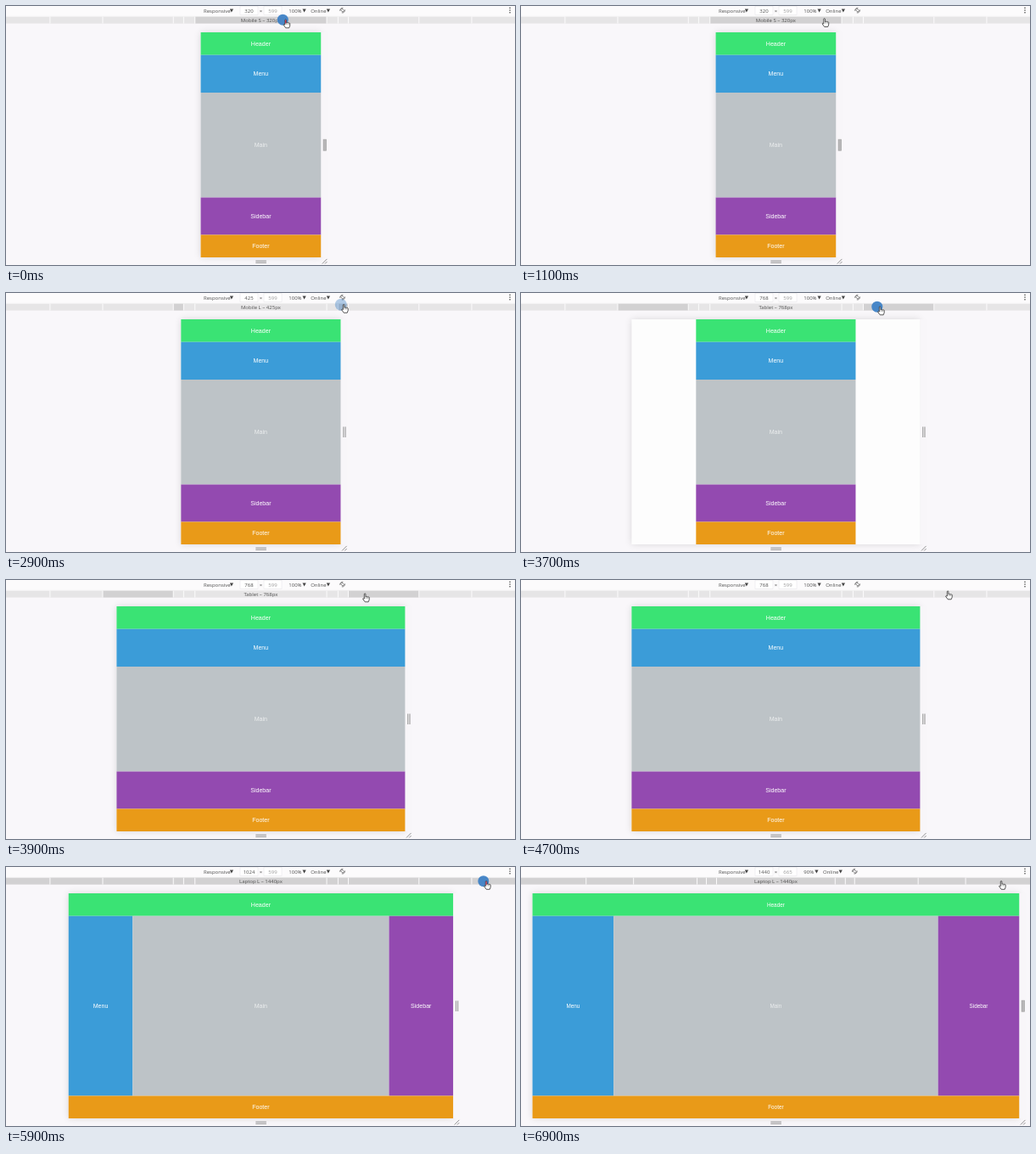
An HTML page for the animation above (7 s loop, 600x305 px).

```html
<!DOCTYPE html>
<html lang="en">
<head>
<meta charset="utf-8">
<title>Responsive layout</title>
<style>
html, body { margin: 0; width: 100%; height: 100%; overflow: hidden; background: #f9f7fa; }
svg { display: block; width: 100%; height: 100%; }
.ui { font: 6px "Open Sans", "Noto Sans", sans-serif; fill: #505050; }
.page { font-family: "Liberation Sans", Arial, sans-serif; fill: #fff; text-anchor: middle; }
</style>
</head>
<body>
<svg id="stage" viewBox="0 0 600 305" xmlns="http://www.w3.org/2000/svg"></svg>
<script>
const NS = "http://www.w3.org/2000/svg";
const LOOP = 7000, STEP = 100, CX = 300.4;
const stage = document.getElementById("stage");

function set(el, attrs) {
  for (const k in attrs) el.setAttribute(k, attrs[k]);
  return el;
}
function add(parent, tag, attrs, text) {
  const el = set(document.createElementNS(NS, tag), attrs || {});
  if (text) el.textContent = text;
  parent.appendChild(el);
  return el;
}
const rect = (p, x, y, width, height, fill) => add(p, "rect", { x, y, width, height, fill });
const show = (el, on) => el.setAttribute("visibility", on ? "visible" : "hidden");

// toolbar
const defs = add(stage, "defs");
const blur = add(defs, "filter", { id: "soft", x: "-10%", y: "-10%", width: "120%", height: "120%" });
add(blur, "feGaussianBlur", { stdDeviation: 4 });
rect(stage, 0, 0, 600, 305, "#f9f7fa");
rect(stage, 0, 0, 600, 11.5, "#fcfbfc");
const bar = add(stage, "g", { class: "ui" });

function menu(x, width) {
  const g = add(bar, "g", { transform: `translate(${x} 0)` });
  const label = add(g, "text", { x: 0, y: 7.7 });
  const arrow = add(g, "path", { fill: "#444" });
  return (text, left, w) => {
    label.textContent = text;
    set(g, { transform: `translate(${left} 0)` });
    set(arrow, { d: `M${w - 4.2} 3.6h4.2l-2.1 4z` });
  };
}
menu()("Responsive", 233, 35);
const setZoom = menu(), setNet = menu();

function field(x, fill) {
  add(bar, "rect", { x, y: 0.2, width: 21, height: 10.2, fill: "#fff", stroke: "#e4e2e5", "stroke-width": 0.5 });
  return add(bar, "text", { x: x + 10.5, y: 7.7, "text-anchor": "middle", fill });
}
const wide = field(276), high = field(304);
high.style.fill = "#999";
add(bar, "text", { x: 300.4, y: 7.7, "text-anchor": "middle" }, "×");
const rotate = add(bar, "g", { fill: "none", stroke: "#555", "stroke-width": 0.7 });
add(rotate, "rect", { x: -1.7, y: -1.2, width: 3.4, height: 2.4, transform: "rotate(45)" });
add(rotate, "path", { d: "M-2.8 .8A3 3 0 0 1 .8-2.8M2.8-.8A3 3 0 0 1-.8 2.8" });
for (const cy of [2.3, 5, 7.7]) add(bar, "circle", { cx: 594, cy, r: 0.8, fill: "#444" });

// breakpoint ruler, widest bar first
const PRESETS = [
  ["Laptop L", 1440], ["Laptop", 1024], ["Tablet", 768],
  ["Mobile L", 425], ["Mobile M", 375], ["Mobile S", 320]
];
const LIGHT = "#e6e5e6", DARK = "#d2d1d2";
const bands = PRESETS.map(([name, size]) => ({
  name, size,
  edge: rect(stage, 0, 12.6, 1, 8, "#fcfbfc"),
  fill: rect(stage, 0, 12.6, 1, 8, LIGHT)
}));
const hint = add(stage, "text", { class: "ui", x: CX, y: 18.9, "text-anchor": "middle" });

function drawRuler(hover, scale) {
  const widest = hover === 1440;
  for (const b of bands) {
    const half = b.size * 0.2427 * scale;
    set(b.edge, { x: CX - half - 0.5, width: 2 * half + 1 });
    set(b.fill, {
      x: CX - half + 0.5, width: 2 * half - 1,
      fill: widest || b.size === hover ? DARK : LIGHT
    });
    if (b.size === hover) hint.textContent = `${b.name} – ${b.size}px`;
  }
  show(hint, hover > 0);
}

// page
const shadow = add(stage, "rect", { y: 31, height: 265, fill: "#000", opacity: 0.13, filter: "url(#soft)" });
const strip = rect(stage, 0, 31, 8, 265, "#f8f6f9");
const sheet = rect(stage, 0, 31, 1, 265, "#fdfdfd");
const page = add(stage, "g", { class: "page" });
const blocks = {};
for (const [name, fill] of [
  ["Header", "#3ae374"], ["Menu", "#3b9cd8"], ["Main", "#bdc3c7"],
  ["Sidebar", "#934ab0"], ["Footer", "#e99a18"]
]) {
  blocks[name] = { box: rect(page, 0, 0, 1, 1, fill), label: add(page, "text", {}, name) };
}
blocks.Main.label.style.fill = "#eceeef";

function place(name, x, y, right, bottom, size) {
  const b = blocks[name];
  set(b.box, { x, y, width: right - x, height: bottom - y });
  set(b.label, { x: (x + right) / 2, y: (y + bottom) / 2 + size * 0.36, "font-size": size });
}

function drawPage(view, content, zoom) {
  const unit = 0.4427 * zoom, size = 16 * unit;
  const half = view * unit / 2, inner = content * unit / 2;
  const l = CX - inner, r = CX + inner;
  set(shadow, { x: CX - half, width: 2 * half });
  set(sheet, { x: CX - half, width: 2 * half });
  set(strip, { x: CX + half });
  place("Header", l, 31, r, 57.7, size);
  place("Footer", l, 269.5, r, 296, size);
  if (content >= 1024) {
    const side = inner / 3;
    place("Menu", l, 57.7, l + side, 269.5, size);
    place("Main", l + side, 57.7, r - side, 269.5, size);
    place("Sidebar", r - side, 57.7, r, 269.5, size);
  } else {
    place("Menu", l, 57.7, r, 102, size);
    place("Main", l, 102, r, 225.5, size);
    place("Sidebar", l, 225.5, r, 269.5, size);
  }
  set(grips, { transform: `translate(${CX + half} 0)` });
  show(solid, view === 320 || view === 1440);
}

// resize handles
const grips = add(stage, "g", { fill: "none", stroke: "#777", "stroke-width": 0.8 });
add(grips, "path", { d: "M3.4 157.5v12.5M5.6 157.5v12.5M1.6 303.5l5.6-5.6M4.8 303.5l2.4-2.4" });
const solid = rect(grips, 2.9, 157.2, 3.2, 13, "#b9b8b9");
solid.setAttribute("stroke", "#aaa");
add(stage, "path", { d: "M294.3 300.2h12.6M294.3 302.3h12.6", stroke: "#777", "stroke-width": 0.8 });

// pointer
const dot = add(stage, "circle", { fill: "#3f82c6" });
const hand = add(stage, "g");
add(hand, "path", {
  d: "M-2.2-4.6q.8-1 1.6 0v3.4q.8-.8 1.5 0 .8-.6 1.4.2 1-.4 1.4.6v2.6L2.7 4.8h-4L-4 1.1q.3-1.1 1.8 0z",
  fill: "#fff", stroke: "#222", "stroke-width": 0.75, "stroke-linejoin": "round"
});
add(hand, "path", { d: "M-.6-1v2M.9-1v2M2.3-.8v1.8", stroke: "#555", "stroke-width": 0.4 });
const tip = add(hand, "path", { d: "M-1.4-4.4v4", stroke: "#c8324e", "stroke-width": 1.2 });

// timeline: moves are [start, end, x, y], switches are [time, value]
const START = [331, 21];
const MOVES = [
  [700, 1500, 387, 18.5], [1800, 2300, 399.5, 18.5], [3100, 3500, 424.5, 21],
  [3900, 4700, 504.5, 18], [5200, 5700, 567.5, 21.5]
];
const HOVER = [[0, 320], [1400, 375], [2400, 425], [3400, 768], [4400, 0], [4800, 1024], [5600, 1440]];
const VIEW = [[0, 320], [1700, 375], [2900, 425], [3600, 768], [5000, 1024], [6100, 1440]];
const CONTENT = [[0, 320], [1700, 375], [2900, 425], [3800, 768], [5000, 1024], [6100, 1440]];
const CLICKS = [[-100, 200], [1500, 2000], [2700, 3000], [3500, 3900], [4800, 5100], [5900, 6300]];

const at = (list, t) => list.reduce((v, [time, value]) => (t >= time ? value : v), 0);
const ease = u => u * u * (3 - 2 * u);

function pointer(t) {
  let [x, y] = START;
  for (const [from, to, nx, ny] of MOVES) {
    const k = ease(Math.min(1, Math.max(0, (t - from) / (to - from))));
    x += (nx - x) * k;
    y += (ny - y) * k;
  }
  return [x, y];
}

function draw(time) {
  const t = Math.floor((time % LOOP) / STEP) * STEP;
  const view = at(VIEW, t), large = view === 1440, zoom = large ? 0.9 : 1;
  drawRuler(at(HOVER, t), zoom);
  drawPage(view, at(CONTENT, t), zoom);
  wide.textContent = view;
  high.textContent = large ? 665 : 599;
  setZoom(large ? "90%" : "100%", 333.3, large ? 17.2 : 20.4);
  setNet("Online", large ? 356 : 359.2, 22.8);
  set(rotate, { transform: `translate(${large ? 393.3 : 396.6} 5.1)` });

  const [x, y] = pointer(t);
  set(hand, { transform: `translate(${x} ${y})` });
  const click = CLICKS.find(([from, to]) => t >= from && t < to);
  show(dot, click);
  show(tip, click && t - click[0] <= 100 && (t < 200 || t > 5800));
  if (click) {
    const fading = click[1] - t <= STEP;
    set(dot, { cx: x - 4.7, cy: y - 4.8, r: fading ? 7 : 6.5, opacity: fading ? 0.4 : 0.95 });
  }
}

const begin = performance.now();
function tick() {
  draw(performance.now() - begin);
  requestAnimationFrame(tick);
}
tick();
</script>
</body>
</html>
```
